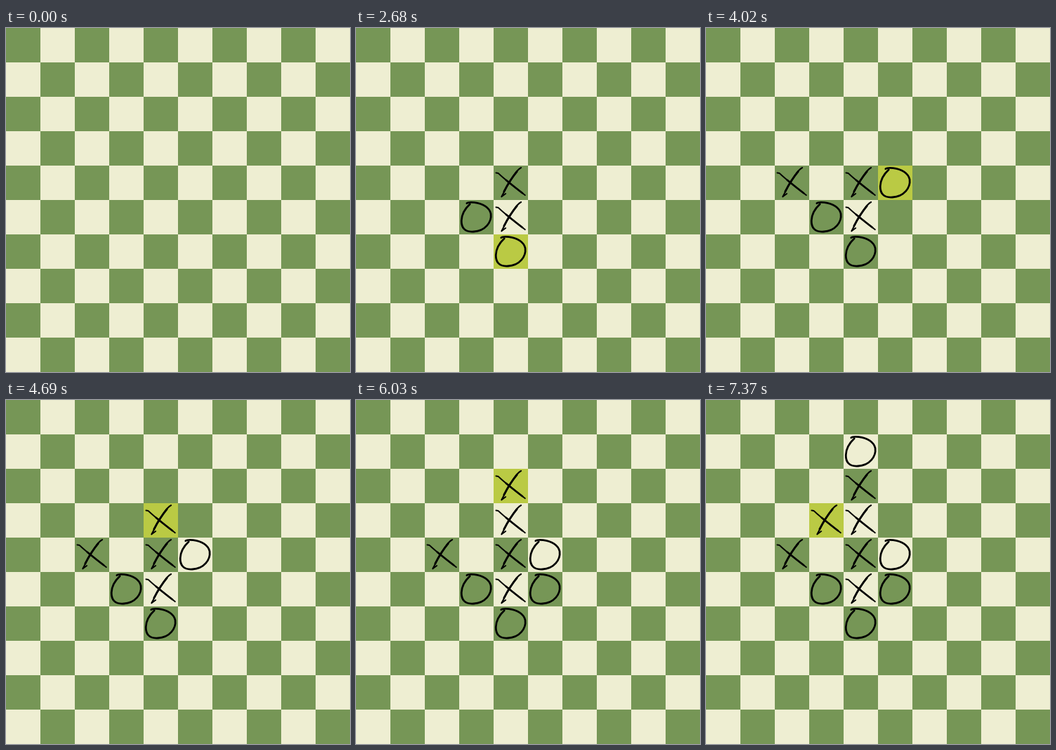
An HTML page with a canvas for the animation above (8000 ms loop, 500 px wide and 500 px high).

```html
<!DOCTYPE html>
<html lang="en">
<head>
<meta charset="utf-8">
<title>Noughts and crosses</title>
<style>
  html, body { margin: 0; width: 100%; height: 100%; overflow: hidden; background: #eeeed2; }
  canvas { display: block; width: 500px; height: 500px; }
</style>
</head>
<body>
<canvas id="board" width="500" height="500"></canvas>
<script>
const ctx = document.getElementById('board').getContext('2d');
const CELL = 50, SIZE = 10, STEP = 670, LOOP = 8000;
const LIGHT = '#eeeed2', DARK = '#769656', LAST = '#baca44';

// Column and row of each move; X and O alternate.
const moves = [
  [4, 4], [3, 5], [4, 5], [4, 6], [2, 4], [5, 4],
  [4, 3], [5, 5], [4, 2], [4, 1], [3, 3]
];

// Pen strokes inside one cell: [line width, path].
const pen = (width, d) => [width, new Path2D(d)];
const cross = [
  pen(2, 'M3.5 10.5 L6.5 11 C10 14 15 18.5 21 23.5 C29 30 38 37 45.8 43'),
  pen(2.8, 'M18 21 C26 27.5 34 34 42 40'),
  pen(2, 'M40 3 C36 5 32 10 28.5 15.5 C22.5 24.5 17 34 11.5 45.3 L17.5 40.8'),
  pen(2.8, 'M34 8.5 C27 17 20 28 15 38')
];
const nought = [
  pen(2.8, 'M11 4.8 C13 3 18 3.2 22 3.6 C34 5 44 11 46 20 C47.5 32 38 45 21 46 C8 47 3 40 3.3 30 C3.6 20 9 12 15.5 6')
];

function fillCell(col, row, color) {
  ctx.fillStyle = color;
  ctx.fillRect(col * CELL, row * CELL, CELL, CELL);
}

function drawMark(col, row, strokes) {
  ctx.save();
  ctx.translate(col * CELL, row * CELL);
  for (const [width, path] of strokes) {
    ctx.lineWidth = width;
    ctx.stroke(path);
  }
  ctx.restore();
}

function draw(count) {
  for (let row = 0; row < SIZE; row++) {
    for (let col = 0; col < SIZE; col++) {
      fillCell(col, row, (row + col) % 2 ? LIGHT : DARK);
    }
  }
  if (count) fillCell(...moves[count - 1], LAST);
  ctx.strokeStyle = '#000';
  ctx.lineCap = ctx.lineJoin = 'round';
  moves.slice(0, count).forEach(([col, row], i) => {
    drawMark(col, row, i % 2 ? nought : cross);
  });
}

const start = performance.now();
let shown = -1;

function tick() {
  const time = (performance.now() - start) % LOOP;
  const count = Math.min(moves.length, Math.floor(time / STEP));
  if (count !== shown) draw(shown = count);
  requestAnimationFrame(tick);
}
tick();
</script>
</body>
</html>
```
